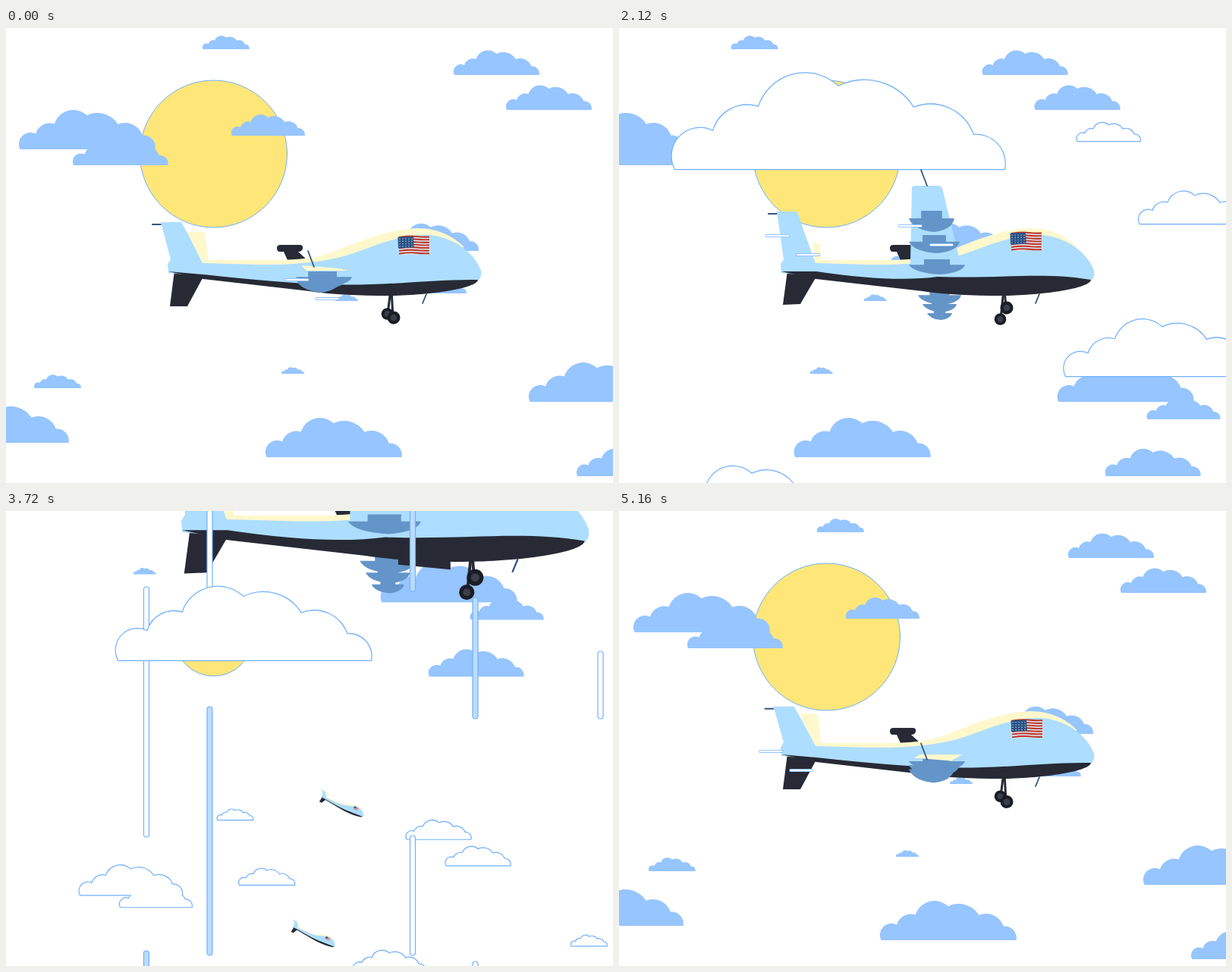
An HTML page that plays this animation: 800 px wide and 600 px high, repeating every 5200 ms.

```html
<!DOCTYPE html>
<html lang="en">
<head>
<meta charset="utf-8">
<title>Drone flight</title>
<style>
html, body { margin: 0; width: 100%; height: 100%; overflow: hidden; background: #fff; }
svg { display: block; width: 800px; height: 600px; }
</style>
</head>
<body>
<svg id="stage" viewBox="0 0 800 600"></svg>
<script>
const LOOP = 5200, STEP = 40, DRIFT = 0.0525;
const CLIMB = 2880, SWAP = 3720, LEVEL = 5080;
const SKY = '#70b0ff', PALE = '#96c5ff', SKIN = '#addeff', CREAM = '#fff8cc', DARK = '#272a35', POD = '#6495c8', ROD = '#345780';
const stage = document.getElementById('stage');

const clamp = v => Math.max(0, Math.min(1, v));
const smooth = (a, b, t) => { const u = clamp((t - a) / (b - a)); return u * u * (3 - 2 * u); };
const repeat = (n, draw) => Array.from({ length: n }, (_, i) => draw(i)).join('');

// Eased values between [time, value] keys.
function track(keys, t) {
  const next = keys.findIndex(k => k[0] > t);
  if (next < 0) return keys[keys.length - 1][1];
  if (next === 0) return keys[0][1];
  const [t0, v0] = keys[next - 1], [t1, v1] = keys[next];
  return v0 + (v1 - v0) * smooth(t0, t1, t);
}

const path = (d, fill, more = '') => `<path d="${d}" fill="${fill}" ${more}/>`;
const line = (d, color, width) => path(d, 'none', `stroke="${color}" stroke-width="${width}" stroke-linecap="round"`);
const disc = (x, y, r, fill) => `<circle cx="${x}" cy="${y}" r="${r}" fill="${fill}"/>`;
const group = (transform, body) => `<g transform="${transform}">${body}</g>`;

const PUFF = 'M4 127A37 37 0 0 1 54 77A47 47 0 0 1 114 45A64 64 0 0 1 219 18A76 76 0 0 1 318 46A60 60 0 0 1 397 82A38 38 0 0 1 438 127Z';
const EDGE = `stroke="${SKY}" stroke-width="2.4" vector-effect="non-scaling-stroke"`;

function cloud(x, base, width, fill, more) {
  const s = width / 439;
  return group(`translate(${x} ${base - 127 * s}) scale(${s})`, path(PUFF, fill, more));
}
// Outlines go below all fills, so that overlapping clouds merge.
const whiteClouds = list => [EDGE, ''].map(more => list.map(c => cloud(...c, '#fff', more)).join('')).join('');

// Left end and baseline of the far clouds, by width.
const clouds = Object.entries({
  180: [[17, 160], [689, 493], [342, 566], [-97, 547]],
  126: [[88, 181], [497, 294], [752, 591]],
  113: [[590, 62], [659, 108]],
  97: [[297, 142], [807, 516], [469, 313]],
  62: [[259, 28], [545, 350], [37, 475], [879, 249]],
  30: [[434, 360], [363, 456]]
}).flatMap(([width, spots]) => spots.map(([x, base]) => [x, base, +width]));

// x at 2720 ms, baseline, width, speed
const nearClouds = [
  [-161, 186, 439, .385], [421, 459, 259, .276], [570, 258, 147, .192],
  [431, 149, 83, .288], [-155, 650, 250, .342]
];

const FLAG = path('M517 276L558 275L559 298L518 299Z', '#e4edf5') +
  repeat(7, i => {
    const y = 276 + i * 3.6;
    return path(`M518 ${y}Q532 ${y - 2} 541 ${y - 1}T558 ${y - .5}`, 'none', 'stroke="#bd3a2e" stroke-width="2.1"');
  }) +
  path('M516.5 275.5L537 275L537.5 289.5L517 290.5Z', '#285185') +
  repeat(20, i => disc(519 + i % 5 * 4, 278 + (i / 5 | 0) * 3.3, .7, '#d5e4f2'));

function pod(x, y, w, h) {
  return path(`M${x} ${y + h * .36}H${x + w * .27}V${y}H${x + w * .73}V${y + h * .36}H${x + w}` +
    `Q${x + w * .95} ${y + h * .9} ${x + w * .55} ${y + h}Q${x + w * .1} ${y + h * .9} ${x} ${y + h * .36}Z`, POD);
}

function wheels(lean, gear) {
  const wheel = (x, y, r) => disc(x, y, r, '#1b1d25') + disc(x, y, r / 2, '#3a3e4b');
  const rear = 377 - 7 * lean, front = 382 + 13 * lean;
  return group(`translate(0 ${(gear - 1) * 50})`,
    line(`M507 345L503 ${rear}`, DARK, 3) + line(`M508 345L510 ${front}`, DARK, 3) +
    wheel(502.5, rear, 7.8) + wheel(511, front, 8.5));
}

function nearWing(lean, open) {
  const tip = 315 + 107 * lean, root = 320 + 11 * lean, under = lean < 0;
  const pods = repeat(3, i => pod(382, 321 + lean * (80 - 32 * i), 60 + 7 * i, 28 - 4 * i));
  const panel = under
    ? path(`M386 ${tip + 2}Q386 ${tip} 392 ${tip}H420Q425 ${tip} 426 ${tip + 3}L449 ${root - 4}L456 ${root + 3}H384Z`, SKIN)
    : path(`M396 ${root}H452L438 ${tip + 2}L389 ${tip - 2}Z`, CREAM);
  return group(`translate(0 ${318 * (1 - open)}) scale(1 ${open})`,
    (under ? panel + pods : pods + panel) + line(`M398 ${tip - 21}L406 ${tip}`, ROD, 1.8));
}

// roll: -1 shows the underside of the near wing, 1 shows its top
function drone(roll, open, bay) {
  const lean = roll < 0 ? roll : roll * .45, bank = Math.min(roll, 0);
  const fin = 256 + 14 * lean, finX = 204 - 4 * lean, farFin = 269 - 15 * lean;
  const belly = 341 + 10 * bank, tail = 325 + 4 * bank;
  let out = '';
  if (open > 0) {
    out += repeat(3, i => pod(394 + 6 * i, 318 - lean * (27 + 13 * i), 57 - 12 * i, 20 - 3 * i));
    out += wheels(lean, open);
    out += path('M357 290Q357 286 362 286H387Q392 286 391 291Q390 295 385 295L397 306H371L366 295H361Q357 295 357 290Z', DARK);
  }
  if (bay > 0) out += path(`M433 340H486V${350 + 11 * bay}L433 ${347 + 9 * bay}Z`, DARK);
  out += line('M554 351L549 363', ROD, 1.8);
  out += line(`M${finX - 11} ${fin + 3}h11`, ROD, 2);
  out += path(`M222 320L260 328L239 ${367 + 3 * bank}L216 ${367 + 2 * bank}Z`, DARK);
  out += path(`M${238 - 18 * bank} ${farFin}L${262 - 2 * bank} ${farFin}L267 309H258Z`, CREAM);
  out += path('M257 306H350Q390 306 412 301C450 291 490 266 542 264C570 264 590 275 604 289L535 310L257 318Z', CREAM);
  out += path('M213 311Q224 306 260 310L330 312Q400 313 445 301C480 291 505 276 545 273C585 270 618 296 626 320Q628 329 621 334Q520 350 400 341L214 323Z', SKIN);
  out += path(`M214 321L260 ${tail}Q360 336 420 ${belly - 3}C500 ${belly} 560 ${belly - 10} 622 332C620 345 545 354 490 353Q430 352 400 347L260 331Z`, DARK);
  out += path(`M${finX} ${fin}H${finX + 27}L241 ${fin + 18}L259 310L213 312L217 305Z`, SKIN);
  out += group(`translate(${lean} ${5 * lean})`, FLAG);
  return out + (open > 0 ? nearWing(lean, open) : '');
}

const place = (x, y, scale, angle, body) =>
  group(`translate(${x} ${y}) rotate(${angle}) scale(${scale}) translate(-420 -310)`, body);

const rollKeys = [[-120, 1], [0, 0], [240, -1], [2150, -1], [2600, 1], [2900, 1], [3300, -1]];

function streaks(t, roll) {
  const shift = (t % 200 - 120) * 1.07, tilt = Math.abs(roll);
  const dash = (x, y) => x < 110 ? '' : line(`M${x} ${y}h28`, SKY, 4) + line(`M${x} ${y}h28`, '#fff', 2.6);
  return repeat(2, i => dash(241 + 40 * i - 46 * tilt - shift, 332 + 25 * i - 58 * tilt) +
    (roll === -1 && t > 700 ? dash(370 + 41 * i - shift, 261 + 25 * i) : ''));
}

// x, top at SWAP, length
const lanes = [[185, 100, 330], [268.5, 258, 328], [536, 428, 158], [618.5, 114, 160], [783.5, 185, 89]];

function bars(t) {
  return lanes.map(([x, top, length], lane) => repeat(3, i => {
    const y = top + (i - 1) * 480 + (SWAP - t) * 1.5;
    return `<rect x="${x - 3.5}" y="${y}" width="7" height="${length}" rx="3.5" ` +
      `fill="${(lane + i) % 2 ? '#fff' : '#bcdcff'}" stroke="${SKY}" stroke-width="1.2"/>`;
  })).join('');
}

function frame(t) {
  const climb = Math.max(0, (t - CLIMB) / (SWAP - CLIMB));
  const lift = 392 * climb * climb, zoom = 1 + .3 * climb;
  const left = Math.max(0, (LEVEL - t) / (LEVEL - SWAP));   // arrival still to go
  const oldScene = t < 4200, climbing = t > 3150;
  const blue = t >= 4200 && t < 4800;
  const radius = 97 - 45.3 * Math.min(smooth(CLIMB, SWAP, t), left ** .56);

  let out = `<rect width="800" height="600" fill="${blue ? SKY : '#fff'}"/>`;
  out += `<circle cx="273.5" cy="166" r="${radius}" fill="#ffe678" stroke="${SKY}"/>`;

  if (oldScene) out += clouds.map(([x, y, w]) => cloud(x - DRIFT * t, y - lift * .95, w, PALE)).join('');
  if (climbing) {
    const s = 1 - .42 * Math.max(0, left - .41);
    const moved = clouds.map(([x, y, w]) => [
      x * s + .05 * (LOOP - t) + 40 * (1 - s), y * s + 386 * left ** 1.3, w * s]);
    const isWhite = i => oldScene || (t < 4700 && (i === 0 || i === 4));
    out += moved.filter((c, i) => !isWhite(i)).map(c => cloud(...c, PALE)).join('');
    out += whiteClouds(moved.filter((c, i) => isWhite(i)));
  }

  const front = oldScene ? whiteClouds(nearClouds.map(([x, y, w, v]) =>
    [x + (2720 - t) * v, y * zoom - lift * 1.02, w * zoom])) : '';
  if (!climbing) out += front;

  // Small drones drop from the bay; the last one grows into the next aircraft.
  if (t > 2240 && oldScene) {
    const small = drone(1, 0, 0);
    out += repeat(4, i => {
      const age = (t - 2240 - i * 120) / 480;
      if (age < 0 || (i === 3 && t > SWAP)) return '';
      const drop = age ** 2.45, size = (.108 + .04 * climb) * Math.min(1, .4 + 1.2 * age);
      return place(474 - 23 * age - 14 * drop + .345 * lift, 352 + 76 * drop - 1.454 * lift, size, 24, small);
    });
  }

  if (oldScene) {
    const roll = track(rollKeys, t);
    out += group(`translate(${-46 * climb} ${-lift}) scale(${zoom})`,
      drone(roll, 1, smooth(2200, 2400, t)) + streaks(t, roll));
  }
  if (t > SWAP) {
    const roll = track(rollKeys, t - LOOP), open = smooth(4600, 5040, t);
    const x = track([[SWAP, 444], [4520, 404.5], [LEVEL, 420]], t);
    const y = track([[SWAP, 386], [4520, 431], [LEVEL, 310]], t);
    out += place(x, y, 1 - .852 * left ** .716, 24 * left ** 1.76,
      drone(roll, open, 0) + (open === 1 ? streaks(t, roll) : ''));
  }
  if (climbing && oldScene) out += bars(t) + front;
  stage.innerHTML = out;
}

const start = performance.now();
function tick() {
  const t = (performance.now() - start) % LOOP;
  frame(Math.floor(t / STEP) * STEP);
  requestAnimationFrame(tick);
}
tick();
</script>
</body>
</html>
```
